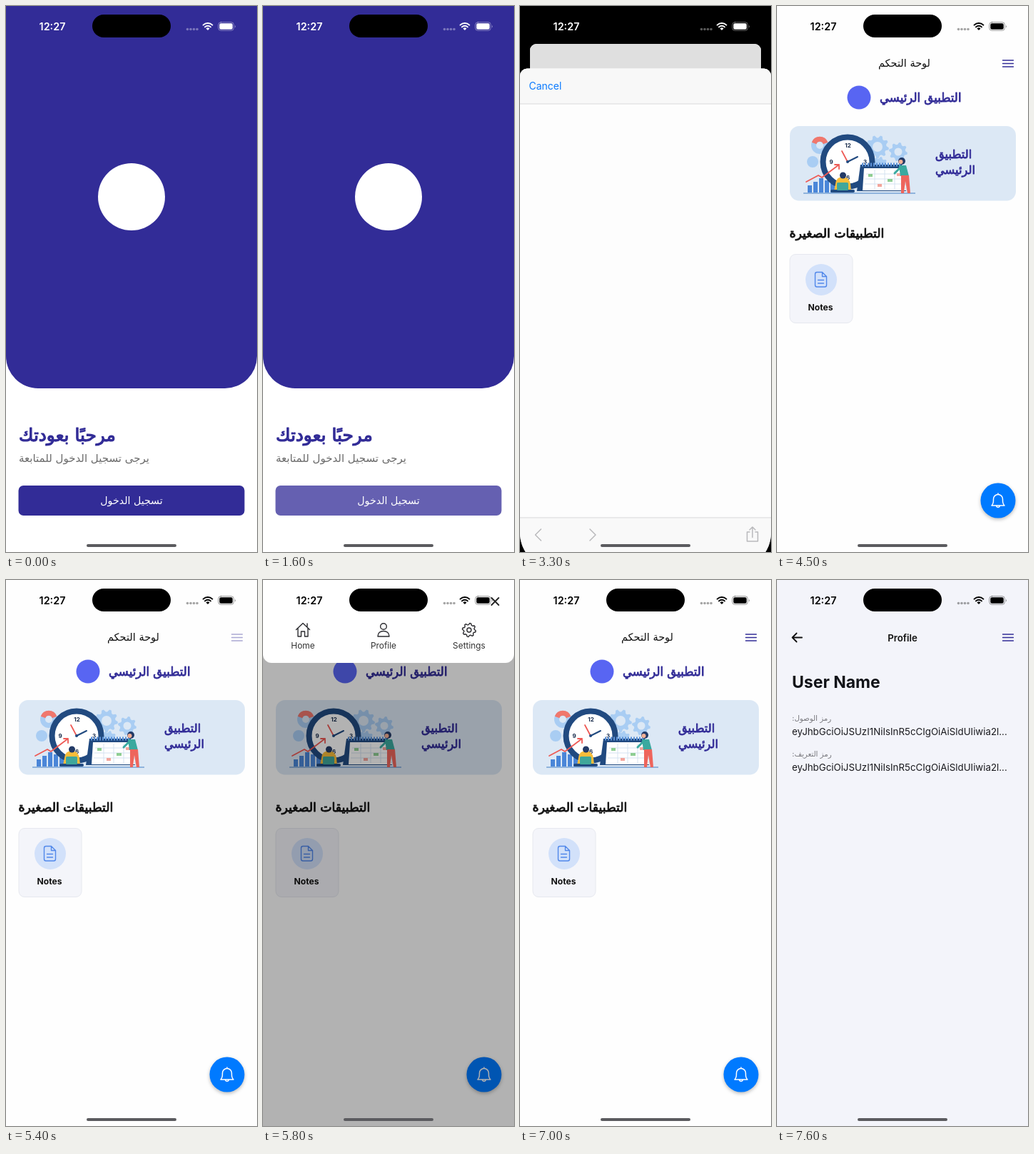
Animation, 352 px wide and 764 px high, one loop 8000 ms. Source, as an HTML page:

```html
<!DOCTYPE html>
<html lang="ar">
<head>
<meta charset="utf-8">
<title>Sign-in flow</title>
<style>
  html, body { margin: 0; width: 100%; height: 100%; overflow: hidden; background: #000; }
  #stage { position: relative; width: 352px; height: 764px; overflow: hidden; background: #000; }
  #stage svg, .layer { position: absolute; left: 0; top: 0; width: 352px; height: 764px; }
  #app { overflow: hidden; background: #fefefe; transform-origin: 0 0; }
  #shade, #dim, #sheetDim { background: #000; opacity: 0; }
  #sheet { transform: translateY(764px); }
  #alert { opacity: 0; transform-origin: 176px 394px; }
  #menu { transform: translateY(-120px); }
  #profile { transform: translateX(352px); }
  #status { color: #fff; }
  #home { position: absolute; left: 113px; top: 753px; width: 126px; height: 4px; border-radius: 2px; background: #5b5b5f; }
  #fab { filter: drop-shadow(0 2px 2.5px #0004); }
  text { font-family: Inter, sans-serif; white-space: pre; }
  .ar { font-family: "DejaVu Sans", sans-serif; }
  .heavy { stroke-width: .05em; stroke-linejoin: round; }
  .ink { fill: #322c97; stroke: #322c97; }
  .dark { fill: #111; stroke: #111; }
  .mid { text-anchor: middle; }
  .semi { font-weight: 600; }
  .bold { font-weight: 700; }
  .line { fill: none; stroke-linecap: round; stroke-linejoin: round; }
</style>
</head>
<body>
<div id="stage">
  <div id="app" class="layer">
    <svg id="dash" viewBox="0 0 352 764">
      <rect width="352" height="764" fill="#fefefe"/>
      <g id="head">
        <text class="ar mid" x="178.500" y="85" font-size="14.500" fill="#111">لوحة التحكم</text>
        <path id="burger" class="line" d="M316.500 76h15M316.500 80.500h15M316.500 85h15" stroke="#322c97" stroke-width="1.300"/>
      </g>
      <g id="content">
        <circle cx="115" cy="128" r="16.500" fill="#5865f2"/>
        <text class="ar heavy ink" x="144" y="134" font-size="16.600">التطبيق الرئيسي</text>
        <rect x="18" y="168" width="317" height="104.500" rx="13" fill="#dce8f5"/>
        <g id="art">
          <g fill="#a9cdf3">
            <path data-gear="141 197 16 9"/><path data-gear="170 204 13 8"/><path data-gear="144 222 11 8"/>
          </g>
          <g fill="#dce8f5"><circle cx="141" cy="197" r="7"/><circle cx="170" cy="204" r="5.500"/></g>
          <circle cx="60" cy="195" r="8.500" fill="none" stroke="#a9cdf3" stroke-width="7"/>
          <path d="M52 192a8.500 8.500 0 0 1 16 0" fill="none" stroke="#f0776c" stroke-width="7"/>
          <circle cx="50" cy="218" r="8" fill="#a9cdf3"/>
          <path d="M37 262h157" stroke="#8fb3dc" stroke-width="2"/>
          <path id="bars" stroke="#4a86d8" stroke-width="6"/>
          <circle cx="99" cy="218" r="34.500" fill="#fff" stroke="#214a80" stroke-width="8"/>
          <g class="bold mid" font-size="8" fill="#182c4c">
            <text x="99.500" y="198">12</text><text x="123.500" y="221">3</text>
            <text x="99.500" y="243">6</text><text x="76" y="221">9</text>
          </g>
          <path class="line" d="M99 218l-8-15" stroke="#ee5a55" stroke-width="1.800"/>
          <path class="line" d="M99 218l14-7" stroke="#214a80" stroke-width="2"/>
          <circle cx="99" cy="218" r="2" fill="#214a80"/>
          <path class="line" d="M41 246l17-9 5 3 24-18m-6 0h6v6" stroke="#ee5a55" stroke-width="1.800"/>
          <path d="M117 222h58l6 37h-69z" fill="#214a80"/>
          <path d="M122 227h54l5 31h-61z" fill="#fff"/>
          <path d="M119 222h55" stroke="#5d92d8" stroke-width="5" stroke-dasharray="2 2"/>
          <path d="M125 235h49M124 242h52M123 249h54M137 229v27M151 229v27M165 229v27" stroke="#d5e2f1"/>
          <path d="M128 237h6M155 244h7" stroke="#8fce93" stroke-width="4"/>
          <path d="M141 251h6M168 236h5" stroke="#f3a59c" stroke-width="4"/>
          <path d="M82 249q1-10 10-10t11 10l1 10H80z" fill="#f8bd3b"/>
          <circle cx="92.500" cy="237" r="4.500" fill="#233a66"/>
          <path d="M77 259h30" stroke="#214a80" stroke-width="4" stroke-linecap="round"/>
          <rect x="84" y="247" width="16" height="11" rx="1.500" fill="#40a79b"/>
          <circle cx="175" cy="217" r="5" fill="#233a66"/>
          <circle cx="173.500" cy="218" r="3" fill="#f5b196"/>
          <path d="M171 223h10l4 15h-12z" fill="#3aa99f"/>
          <path class="line" d="M173 226l-8 8" stroke="#3aa99f" stroke-width="3"/>
          <path d="M174 237h11l2 25h-4l-3-17-2 17h-4z" fill="#ee655c"/>
        </g>
        <g class="heavy ink" font-size="16.300">
          <text class="ar" x="222" y="213">التطبيق</text>
          <text class="ar" x="222" y="235">الرئيسي</text>
        </g>
        <text class="ar heavy dark" x="17.500" y="324" font-size="17.300">التطبيقات الصغيرة</text>
        <rect x="18" y="347.500" width="88" height="96" rx="8" fill="#f4f5fa" stroke="#e6e8ef"/>
        <circle cx="62" cy="383" r="22" fill="#d2e1fa"/>
        <path class="line" d="M56 372.500h7.500l6 6v12a2.500 2.500 0 0 1-2.500 2.500H56a2.500 2.500 0 0 1-2.500-2.500v-15.500a2.500 2.500 0 0 1 2.500-2.500zm7.500 0v6h6M57.500 383.500h8M57.500 388h8" stroke="#5188ea" stroke-width="1.400"/>
        <text class="bold mid" x="61" y="426" font-size="12.100" fill="#111">Notes</text>
        <circle id="fab" cx="310" cy="692" r="24.500" fill="#007aff"/>
        <path class="line" d="M301 699c3-3 2.500-6 2.500-9a6.500 6.500 0 0 1 13 0c0 3-.5 6 2.500 9zM307.500 699.500a2.600 2.600 0 0 0 5 0M310 683.500v-1.500" stroke="#fff" stroke-width="1.500"/>
      </g>
    </svg>

    <svg id="login" viewBox="0 0 352 764">
      <rect width="352" height="764" fill="#fff"/>
      <path d="M0 0h352v490a45 45 0 0 1-45 45H45a45 45 0 0 1-45-45z" fill="#322c97"/>
      <circle cx="176" cy="267" r="47" fill="#fff"/>
      <text class="ar heavy ink" x="18" y="608.500" font-size="24.800">مرحبًا بعودتك</text>
      <text class="ar" x="18" y="638" font-size="15" fill="#6a6a6a">يرجى تسجيل الدخول للمتابعة</text>
      <g id="button">
        <rect x="17.500" y="671" width="317" height="42" rx="7" fill="#322c97"/>
        <text class="ar mid" x="176" y="697" font-size="14.200" fill="#fff">تسجيل الدخول</text>
      </g>
    </svg>

    <div id="shade" class="layer"></div>

    <svg id="menu" viewBox="0 0 352 764">
      <path d="M0-20h352v124a12 12 0 0 1-12 12H12a12 12 0 0 1-12-12z" fill="#fff"/>
      <path class="line" d="M320.500 25l10 10m0-10l-10 10" stroke="#222" stroke-width="1.900"/>
      <g class="line" stroke="#2c2c30" stroke-width="1.400">
        <path d="M46.500 69.500l9.500-9 9.500 9M49 67.500v11.500h4.500v-7h5v7h4.500v-11.500M62 65.500v-4.500"/>
        <circle cx="169" cy="65" r="4.300"/>
        <path d="M161 79c0-5 3.500-7.500 8-7.500s8 2.500 8 7.500z"/>
        <path data-gear="289 70 9.500 8"/><circle cx="289" cy="70" r="3"/>
      </g>
      <g class="mid" font-size="11.900" fill="#333">
        <text x="56" y="95.500">Home</text><text x="169" y="95.500">Profile</text><text x="289" y="95.500">Settings</text>
      </g>
    </svg>

    <svg id="profile" viewBox="0 0 352 764">
      <rect width="352" height="764" fill="#f3f4fa"/>
      <path class="line" d="M35 80.500H21.500m6-6l-6 6 6 6" stroke="#111" stroke-width="1.800"/>
      <text class="semi mid" x="176" y="85.500" font-size="13.300" fill="#111">Profile</text>
      <use href="#burger"/>
      <text class="bold" x="21" y="151" font-size="23" fill="#111318">User Name</text>
      <g font-size="10.200" fill="#77777c">
        <text class="ar" x="21" y="197">:رمز الوصول</text>
        <text class="ar" x="21" y="247">:رمز التعريف</text>
      </g>
      <g font-size="13.300" fill="#1a1a1e">
        <text x="21" y="217">eyJhbGciOiJSUzI1NiIsInR5cCIgOiAiSldUIiwia2l...</text>
        <text x="21" y="267">eyJhbGciOiJSUzI1NiIsInR5cCIgOiAiSldUIiwia2l...</text>
      </g>
    </svg>
    <div id="sheetDim" class="layer"></div>
  </div>

  <svg id="sheet" viewBox="0 0 352 764">
    <path d="M0 75a10 10 0 0 1 10-10h332a10 10 0 0 1 10 10v640a49 49 0 0 1-49 49H49a49 49 0 0 1-49-49z" fill="#fdfdfd"/>
    <path d="M0 114V75a10 10 0 0 1 10-10h332a10 10 0 0 1 10 10v39z" fill="#f8f8f8"/>
    <path d="M0 693h352v22a49 49 0 0 1-49 49H49a49 49 0 0 1-49-49z" fill="#f9f9f9"/>
    <path d="M0 114.500h352M0 693.500h352" stroke="#d9d9db"/>
    <text x="12.500" y="95" font-size="14" fill="#0a7aff">Cancel</text>
    <g class="line" stroke="#b9b9bc" stroke-width="1.500">
      <path d="M29.500 709.500l-8 8 8 8M98 709.500l8 8-8 8"/>
      <path d="M322 713.500h-3.500v13h15v-13H330M326 721v-14m-4 3.500l4-4 4 4"/>
    </g>
  </svg>

  <svg id="status" viewBox="0 0 352 764">
    <rect x="121" y="12" width="110" height="32" rx="16" fill="#000"/>
    <g fill="currentColor">
      <text class="semi mid" x="65" y="34" font-size="14.400">12:27</text>
      <g opacity=".35">
        <circle cx="254.500" cy="32.500" r="1.800"/><circle cx="259" cy="32.500" r="1.800"/>
        <circle cx="263.500" cy="32.500" r="1.800"/><circle cx="268" cy="32.500" r="1.800"/>
      </g>
      <path d="M283 34l-2.500-2.600a3.600 3.600 0 0 1 5 0z"/>
      <rect x="299.300" y="24.300" width="18.500" height="8.400" rx="2.200"/>
      <path d="M321 26.500q1.600 2 0 4z" opacity=".5"/>
    </g>
    <g class="line" stroke="currentColor">
      <path d="M276.600 26.600a9.200 9.200 0 0 1 12.800 0M279 29.400a5.800 5.800 0 0 1 8 0" stroke-width="2"/>
      <rect x="297.700" y="22.700" width="21.700" height="11.600" rx="3.600" opacity=".4"/>
    </g>
  </svg>

  <div id="dim" class="layer"></div>

  <svg id="alert" viewBox="0 0 352 764">
    <rect x="58" y="321" width="236" height="147" rx="12" fill="#c8c4e7"/>
    <path d="M58 429.500h236" stroke="#b6b1d9" stroke-width=".7"/>
    <g class="semi mid" font-size="14">
      <text x="176.500" y="352">“host” Wants to Use</text>
      <text x="176.500" y="373">“localhost” to Sign In</text>
    </g>
    <g class="mid" font-size="11.100">
      <text x="176" y="391">This allows the app and website to</text>
      <text x="176" y="409">share information about you.</text>
    </g>
    <g class="mid" font-size="14.100" fill="#0a7aff">
      <text x="117" y="454">Cancel</text><text x="235.500" y="454">Continue</text>
    </g>
  </svg>
  <div id="home"></div>
</div>

<script>
const LOOP = 8000;
const $ = id => document.getElementById(id);
const t0 = document.timeline.currentTime || 0;

// Cog outline: two outer and two inner points per tooth
document.querySelectorAll('[data-gear]').forEach(el => {
  const [cx, cy, r, n] = el.dataset.gear.split(' ').map(Number);
  const pts = [];
  for (let i = 0; i < n * 4; i++) {
    const a = (i + 0.5) / (n * 4) * Math.PI * 2;
    const q = i % 4 < 2 ? r : r * 0.78;
    pts.push((cx + q * Math.cos(a)).toFixed(2) + ' ' + (cy + q * Math.sin(a)).toFixed(2));
  }
  el.setAttribute('d', 'M' + pts.join('L') + 'Z');
});

$('bars').setAttribute('d', [10, 15, 20, 17, 24, 30]
  .map((h, i) => `M${46 + i * 8} 261v${-h}`).join(''));

// rows: [ms, value, easing towards the next row]
function play(id, prop, rows) {
  const all = [[0, rows[0][1]], ...rows, [LOOP, rows[rows.length - 1][1]]];
  const keys = all.map(([ms, v, easing = 'linear']) => ({ offset: ms / LOOP, [prop]: v, easing }));
  $(id).animate(keys, { duration: LOOP, iterations: Infinity }).startTime = t0;
}
const cut = (id, prop, ms, a, b) => play(id, prop, [[ms, a], [ms, b]]);
const y = v => `translateY(${v}px)`;
const x = v => `translateX(${v}px)`;
const card = p => `translate(${14 * p}px, ${53 * p}px) scale(${1 - 0.0796 * p})`;

const OUT = 'cubic-bezier(.2,.8,.2,1)';
const SOFT = 'ease-in-out';
const FALL = 'cubic-bezier(.4,.1,.3,1)';

// Sign-in button and system alert
play('button', 'opacity', [[1400, 1], [1400, 0.75], [1600, 0.75], [1750, 1]]);
play('dim', 'opacity', [[1600, 0, SOFT], [1950, 0.2], [2720, 0.2, SOFT], [2900, 0]]);
play('alert', 'opacity', [[1600, 0, SOFT], [1900, 1], [2720, 1, SOFT], [2880, 0]]);
play('alert', 'transform', [[1600, 'scale(1.15)', OUT], [2000, 'scale(1)']]);
play('home', 'background', [[1900, '#5b5b5f'], [2200, '#d3d3d3'], [2800, '#d3d3d3'], [3000, '#5b5b5f']]);

// Browser sheet pushes the app back as a card
play('sheet', 'transform', [[2780, y(764), OUT], [3180, y(0)], [3200, y(0), 'ease-in'], [3300, y(22), FALL], [3700, y(764)]]);
play('app', 'transform', [[2780, card(0), OUT], [3180, card(1)], [3300, card(1), FALL], [3700, card(0)]]);
play('app', 'borderRadius', [[2780, '0px', OUT], [3000, '10px'], [3500, '10px'], [3700, '0px']]);
play('sheetDim', 'opacity', [[2780, 0, OUT], [3180, 0.12], [3300, 0.12, FALL], [3700, 0]]);
cut('login', 'opacity', 3190, 1, 0);
play('status', 'color', [[3450, '#fff'], [3600, '#000']]);

// Dashboard
cut('head', 'opacity', 3700, 0, 1);
cut('content', 'opacity', 3900, 0, 1);
play('burger', 'opacity', [[5200, 1], [5200, 0.4], [5400, 0.4], [5500, 1]]);

// Drop-down menu
play('menu', 'transform', [[5400, y(-120), OUT], [5750, y(0)], [6400, y(0), SOFT], [6700, y(-120)]]);
play('shade', 'opacity', [[5400, 0, 'ease-out'], [5700, 0.3], [6400, 0.3, SOFT], [6700, 0]]);

// Profile pushed in from the right
play('profile', 'transform', [[7150, x(352), OUT], [7600, x(0)]]);
play('dash', 'transform', [[7150, x(0), OUT], [7600, x(-106)]]);
</script>
</body>
</html>
```
